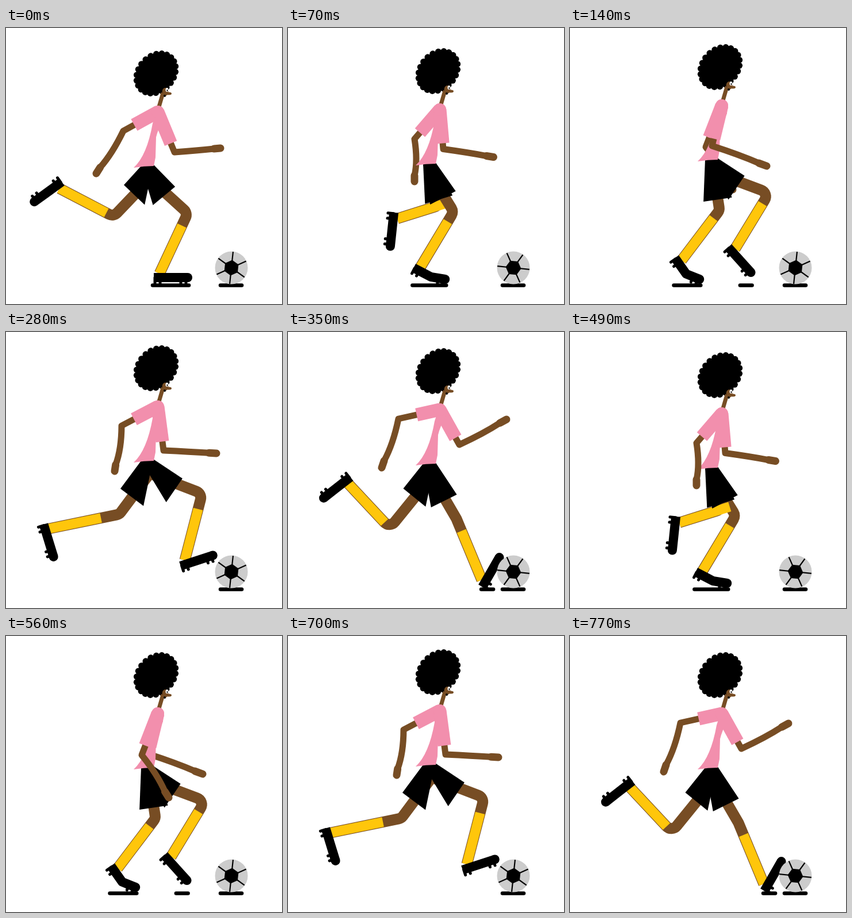
Animation of 480 by 480 pixels, one loop 840 ms. Source, as an HTML page with a canvas:

```html
<!DOCTYPE html>
<html lang="en">
<head>
<meta charset="utf-8">
<title>Runner with ball</title>
<style>
html, body { margin: 0; width: 100%; height: 100%; overflow: hidden; background: #fff; }
canvas { display: block; }
</style>
</head>
<body>
<canvas id="stage" width="480" height="480"></canvas>
<script>
const ctx = document.getElementById('stage').getContext('2d');
const SKIN = '#774d24', PINK = '#f28fad', SOCK = '#ffc60b', BLACK = '#000', GREY = '#ccc';
const STEP = 70, STEPS = 12, GROUND = 437;

// One cycle of a limb by step; the opposite limb runs half a cycle later.
// Arm: elbow, hand
const armKeys = {
  0: [293,216, 373,209],
  2: [247,205, 342,240],
  4: [201,163, 189,242],
  5: [192,151, 163,236],
  6: [204,179, 157,253],
  8: [236,207, 283,281],
  10: [274,206, 366,211],
  11: [298,196, 380,152]
};
// Leg: knee, ankle, foot angle in degrees
const legKeys = {
  0: [316,322, 267,427, 0],
  2: [260,317, 194,404, 55],
  4: [197,317, 75,342, 73],
  5: [177,341, 105,264, 142],
  6: [187,328, 93,279, 144],
  8: [346,287, 287,384, 48],
  10: [341,281, 311,397, -18],
  11: [293,325, 337,431, -60]
};

// Keyed pose, or the halfway pose between its neighbours
function pose(keys, step) {
  const at = n => keys[(n + STEPS) % STEPS];
  return at(step) || at(step - 1).map((v, i) => (v + at(step + 1)[i]) / 2);
}

// Point reached from p along unit vector u, then sideways along its normal
const move = ([x, y], [ux, uy], along, side = 0) =>
  [x + ux * along - uy * side, y + uy * along + ux * side];

function toward([x0, y0], [x1, y1]) {
  const len = Math.hypot(x1 - x0, y1 - y0);
  return [(x1 - x0) / len, (y1 - y0) / len];
}

function trace(points) {
  ctx.beginPath();
  points.forEach(p => ctx.lineTo(...p));
}

function stroke(width, color, cap = 'butt') {
  ctx.lineWidth = width;
  ctx.lineCap = cap;
  ctx.lineJoin = 'round';
  ctx.strokeStyle = color;
  ctx.stroke();
}

function line(points, width, color, cap) {
  trace(points);
  stroke(width, color, cap);
}

function shape(points, color) {
  trace(points);
  ctx.fillStyle = color;
  ctx.fill();
}

function oval(x, y, rx, ry, color, turn = 0) {
  ctx.beginPath();
  ctx.ellipse(x, y, rx, ry, turn, 0, Math.PI * 2);
  ctx.fillStyle = color;
  ctx.fill();
}

function shadow(x0, x1) {
  line([[x0, 447.5], [x1, 447.5]], 6.5, BLACK, 'round');
}

function drawArm(step, dy) {
  const [ex, ey, hx, hy] = pose(armKeys, step);
  const shoulder = [264, 146 + dy], elbow = [ex, ey], hand = [hx, hy];
  const upper = toward(shoulder, elbow), fore = toward(elbow, hand);
  const reach = Math.hypot(hx - ex, hy - ey);
  const wrist = move(elbow, fore, reach * .86);
  trace([shoulder, elbow]);
  ctx.quadraticCurveTo(...move(elbow, fore, reach / 2, -6 * fore[1]), ...wrist);
  stroke(11, SKIN);
  line([wrist, hand], 13, SKIN, 'round');
  // The sleeve lengthens as the arm hangs down
  const sleeve = 36 + .33 * (ey - shoulder[1]);
  line([shoulder, move(shoulder, upper, sleeve)], 23, PINK);
  oval(...shoulder, 11, 11, PINK);
}

function drawFoot(ankle, degrees) {
  const a = degrees * Math.PI / 180, dir = [Math.cos(a), Math.sin(a)];
  const heel = move(ankle, dir, -10, 7), ball = move(heel, dir, 34), toe = move(ball, dir, 25);
  // Toes bend flat when they meet the ground
  if (toe[1] > GROUND) {
    toe[1] = GROUND;
    toe[0] = ball[0] + Math.sqrt(625 - (GROUND - ball[1]) ** 2);
  }
  const low = [heel, ball, toe].filter(p => p[1] > 399);
  if (low.some(p => p[1] > 415)) {
    const xs = low.map(p => p[0]);
    shadow(Math.min(...xs) - 2, Math.max(...xs) + 2);
  }
  line([heel, ball, toe], 16, BLACK);
  oval(...toe, 8, 8, BLACK);
  const toeDir = toward(ball, toe);
  const stud = (p, u, t) => line([move(p, u, t), move(p, u, t, 10)], 5, BLACK, 'round');
  [2, 11].forEach(t => stud(heel, dir, t));
  [13, 22].forEach(t => stud(ball, toeDir, t));
}

function drawLeg(step, hip) {
  const [kx, ky, ax, ay, angle] = pose(legKeys, step);
  const ankle = [ax, ay];
  trace([hip]);
  ctx.arcTo(kx, ky, ax, ay, 12);
  ctx.lineTo(ax, ay);
  stroke(19, SKIN);
  line([move(ankle, toward(ankle, [kx, ky]), 92), ankle], 17, SOCK);
  drawFoot(ankle, angle);
}

// One trouser leg hangs around the thigh, drooping when it is raised forward
function drawShorts(step, hip, dy) {
  const [kx, ky] = pose(legKeys, step), [ux, uy] = toward(hip, [kx, ky]);
  const axis = toward([0, 0], [ux, uy + .3 * Math.max(0, ux)]);
  const length = 39 - .8 * dy;
  shape([[235, 240 + dy], [256, 237 + dy], move(hip, axis, length, -25), move(hip, axis, length, 25)], BLACK);
}

function drawTorso() {
  ctx.fillStyle = PINK;
  ctx.fill(new Path2D('M265 135Q275 139 273 160Q264 177 261 190L260 225L257 240Q240 240 222 243Q245 222 255 166Z'));
}

function drawHead() {
  const turn = -.82, curls = 22;
  oval(261, 79, 40, 32, BLACK, turn);
  for (let i = 0; i < curls; i++) {
    const a = i / curls * Math.PI * 2, u = 38 * Math.cos(a), v = 30 * Math.sin(a);
    oval(...move([261, 79], [Math.cos(turn), Math.sin(turn)], u, v), 5.5, 5.5, BLACK);
  }
  line([[273, 113], [266, 137]], 7, SKIN);
  oval(277, 111, 5.5, 7, SKIN);
  oval(283, 114, 5, 2.5, SKIN);
  oval(276, 118, 2, 2, BLACK);
  oval(280, 107.5, 2.5, 3.5, '#fff');
  oval(280.5, 108.5, 1, 1.5, BLACK);
}

function drawBall(degrees) {
  const x = 392, y = 417;
  shadow(373, 410);
  oval(x, y, 28.5, 28.5, GREY);
  const rim = r => Array.from({ length: 6 }, (_, i) => {
    const a = (degrees + i * 60) * Math.PI / 180;
    return [x + r * Math.cos(a), y + r * Math.sin(a)];
  });
  shape(rim(13.5), BLACK);
  rim(28).forEach(p => line([[x, y], p], 2.2, BLACK));
}

function lifted(dy, draw) {
  ctx.save();
  ctx.translate(0, dy);
  draw();
  ctx.restore();
}

function draw(step) {
  const other = (step + STEPS / 2) % STEPS;
  // Each stride rises slowly and drops fast
  const dy = Math.round(-16.5 * Math.sin(Math.PI * (step % 6 / 6) ** 1.37));
  const hip = [250, 262 + dy];
  ctx.fillStyle = '#fff';
  ctx.fillRect(0, 0, 480, 480);
  drawArm(other, dy);
  for (const s of [other, step]) drawLeg(s, hip);
  for (const s of [other, step]) drawShorts(s, hip, dy);
  lifted(dy, drawHead);
  lifted(dy, drawTorso);
  drawArm(step, dy);
  drawBall(36 + 30 * step);
}

const start = performance.now();
function tick() {
  draw(Math.floor((performance.now() - start) / STEP) % STEPS);
  requestAnimationFrame(tick);
}
tick();
</script>
</body>
</html>
```
